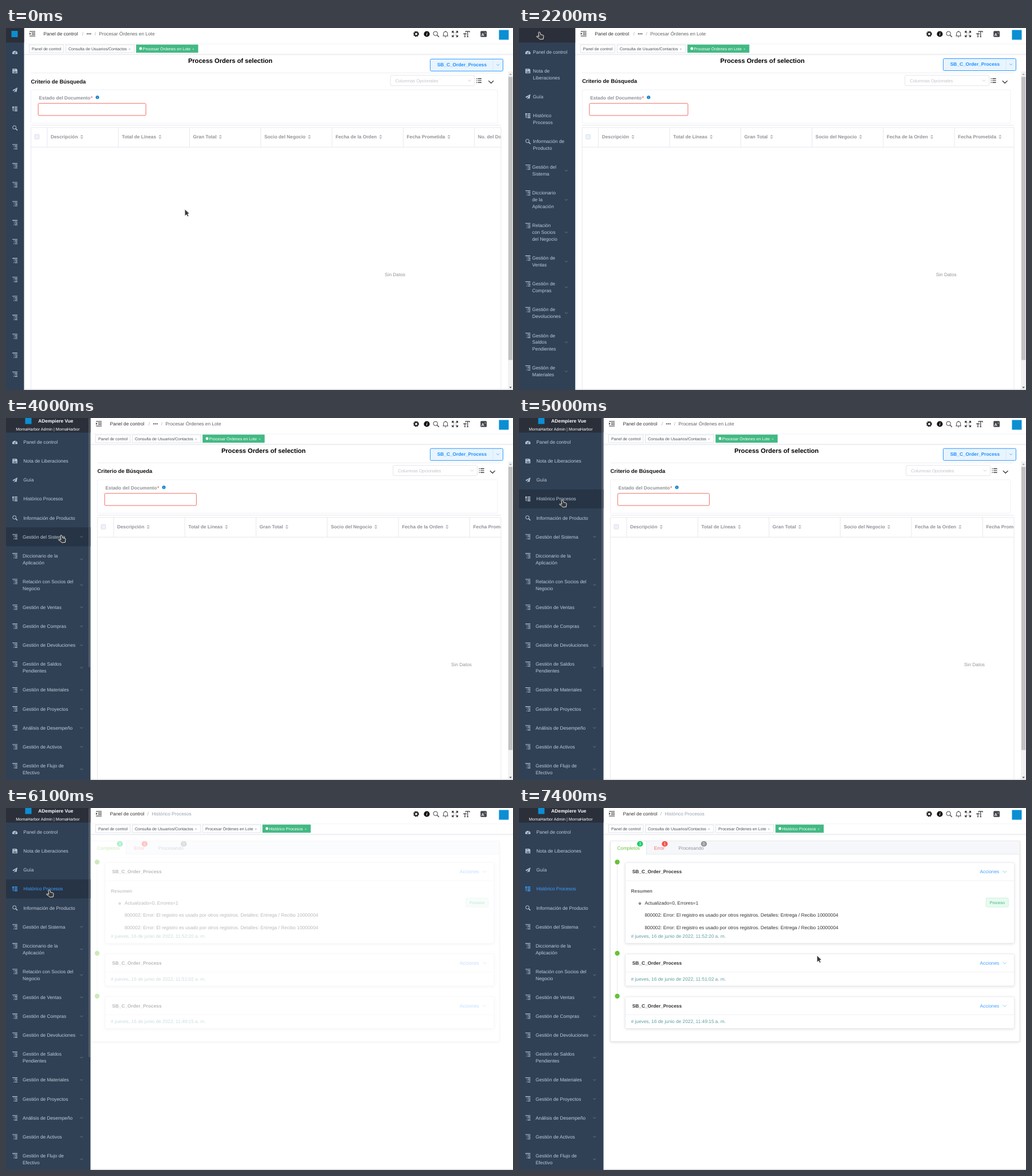
Animation of 885x633 px, one loop 8000 ms. Source, as an HTML page:

```html
<!DOCTYPE html>
<html lang="es">
<head>
<meta charset="utf-8">
<title>Panel de control</title>
<style>
html, body { margin: 0; width: 100%; height: 100%; overflow: hidden; background: #fff; }
svg { display: block; width: 885px; height: 633px; font-family: "Liberation Sans", Arial, sans-serif; text-rendering: geometricPrecision; }
</style>
</head>
<body>
<svg id="stage" viewBox="0 0 885 633" xmlns="http://www.w3.org/2000/svg"></svg>
<script>
const stage = document.getElementById('stage');
const LOOP = 8000, STEP = 100;
const FS = 8.3, SMALL = 7.11;
const BLUE = '#409eff', LOGO = '#0a8fd3', GREEN = '#67c23a', GREY = '#909399', INK = '#303133';
const ORG = 'MornaHarbor Admin | MornaHarbor';
const pen = document.createElement('canvas').getContext('2d');

// drawing helpers; text y is the middle of the capitals
function measure(s, size, bold) {
  pen.font = (bold ? 'bold ' : '') + '100px "Liberation Sans", Arial, sans-serif';
  return pen.measureText(s).width * size / 100;
}
const text = (x, y, s, fill = INK, size = FS, extra = '') =>
  `<text x="${x}" y="${y + size * 0.36}" font-size="${size}" fill="${fill}" ${extra}>${s}</text>`;
const bold = (x, y, s, fill, size = FS, extra = '') => text(x, y, s, fill, size, 'font-weight="700" ' + extra);
const MID = 'text-anchor="middle"';
const rect = (x, y, w, h, fill, stroke = 'none', rx = 0, extra = '') =>
  `<rect x="${x}" y="${y}" width="${w}" height="${h}" rx="${rx}" fill="${fill}" stroke="${stroke}" ${extra}/>`;
const path = (d, stroke, w = 1, fill = 'none') =>
  `<path d="${d}" stroke="${stroke}" stroke-width="${w}" fill="${fill}" stroke-linejoin="round"/>`;
const dot = (x, y, r, fill, stroke = 'none') => `<circle cx="${x}" cy="${y}" r="${r}" fill="${fill}" stroke="${stroke}"/>`;
const at = (x, y, body, op = 1) => `<g transform="translate(${x} ${y})" opacity="${op}">${body}</g>`;
const hline = (x1, x2, y, c) => path(`M${x1} ${y}H${x2}`, c, 0.8);
const vline = (x, y1, y2, c) => path(`M${x} ${y1}V${y2}`, c, 0.8);
const chevron = (x, y, r, c, w = 0.8) => path(`M${x - r} ${y - r / 2}l${r} ${r}l${r} ${-r}`, c, w);

// time helpers
function keyed(keys, t) {
  let i = 0;
  while (i < keys.length - 1 && keys[i + 1][0] <= t) i++;
  const a = keys[i], b = keys[i + 1] || a;
  const k = b === a ? 0 : (t - a[0]) / (b[0] - a[0]);
  return a.slice(1).map((v, j) => v + (b[j + 1] - v) * k);
}
function held(keys, t) {
  return keys.filter(k => k[0] <= t).pop().slice(1);
}

const CURSOR = [
  [0, 312, 317], [200, 312, 317], [400, 189, 47], [600, 189, 47], [1200, 30, 6], [2700, 30, 6],
  [2800, 67, 287], [3500, 85, 235], [3600, 85, 235], [4000, 91, 204], [4500, 80, 174],
  [5000, 70, 142], [6400, 70, 142], [6600, 428, 224], [6700, 428, 224], [7100, 530, 240], [7400, 520, 258]
];
const SIDEBAR = [[0, 31.5], [2200, 98.2], [2300, 135], [2400, 147.5]];
const BRAND = [[0, 0], [2400, 0.5], [2800, 0.86], [3000, 1]];
const TIP = [[0, 0], [2400, 1], [2800, 0.36], [2900, 0.1], [3000, 0]];
const ORDERS = [[0, 1, 0], [5300, 0.96, 1], [5500, 0.4, 15], [5700, 0.06, 27], [5800, 0, 30]];
const HISTORY = [[0, 0, -30], [6100, 0.33, -12.5], [6200, 0.8, -3.5], [6300, 1, 0]];

const MENU = ['Panel de control', 'Nota de Liberaciones', 'Guía', 'Histórico Procesos', 'Información de Producto',
  'Gestión del Sistema', 'Diccionario de la Aplicación', 'Relación con Socios del Negocio', 'Gestión de Ventas',
  'Gestión de Compras', 'Gestión de Devoluciones', 'Gestión de Saldos Pendientes', 'Gestión de Materiales',
  'Gestión de Proyectos', 'Análisis de Desempeño', 'Gestión de Activos', 'Gestión de Flujo de Efectivo', 'Gestión de Calidad'];

function wrap(s, max) {
  return s.split(' ').reduce((lines, word) => {
    const last = lines[lines.length - 1];
    if (last && (last + ' ' + word).length <= max) lines[lines.length - 1] = last + ' ' + word;
    else lines.push(word);
    return lines;
  }, []);
}

// icons centred on 0,0
const search = c => dot(-0.8, -0.8, 3, 'none', c) + path('M1.4 1.4L4.4 4.4', c, 1.5);
const MENU_ICONS = [
  c => path('M-4.4 3.6A4.6 4.6 0 1 1 4.4 3.6Z', 'none', 0, c) + path('M0 2L1.6 -2M-3 .6h1M2.3 .6h1M-2 -2l.6 .6', '#304156', 0.8) + dot(0, 2, 1.1, '#304156'),
  c => path('M-4.2 -4H2.6L4.2 -2.4V4H-4.2Z', 'none', 0, c) + path('M-2.6 -2H1M-2.6 1.2H2.8M-2.6 2.7H2.8', '#304156', 0.9),
  c => path('M4.5 -4.4L-4.5 .6L-2 1.8L3 -2.6L-.6 2.4L2.8 3.8ZM-1.6 2.5V4.5L-.2 3.1Z', 'none', 0, c),
  c => rect(-4.4, -4.2, 2.6, 2.6, c) + path('M-3.4 -2V3.2H-1.4M-3.4 .2H-1.4', c, 0.9) + path('M-.8 -3H4.4M-.6 .2H4.4M-.6 3.2H4.4', c, 1.7),
  search
];
const treeIcon = c => path('M-4.4 -4H4.4M-.4 -1.4H4.4M.8 1.2H4.4M-.4 3.8H4.4', c, 1.1) + path('M-2.6 -1.4h1M-1.4 1.2h1M-2.6 3.8h1', c, 1);

function sidebar(w, t, cur, hand) {
  const open = w > 60, wide = w > 110, active = t >= 5300;
  let out = rect(0, 0, w, 633, '#304156'), y = 42;
  MENU.forEach((name, i) => {
    const sub = i > 4;
    const lines = open ? wrap(name, wide ? 23 : sub ? 11 : 16) : [''];
    const extra = (lines.length - 1) * 11.9;
    const hover = hand && t >= 2900 && cur[1] + 2 > y - 16.6 && cur[1] + 2 <= y + 16.6 + extra;
    const color = active && i === 3 ? BLUE : '#bfcbd9';
    if (hover) out += rect(0, y - 16.6, w, 33.2 + extra, '#263445');
    out += at(15.5, y, (MENU_ICONS[i] || treeIcon)(color));
    const x = (sub ? 29 : 30.3) - (wide ? 0 : 6);
    lines.forEach((s, k) => out += text(x, y + k * 11.9, s, color));
    if (open && sub) out += chevron(w - 15.7, y + extra / 2, 2.4, '#8291a3', 0.7);
    y += 33.15 + extra;
  });
  out += rect(0, 0, w, 25.5, '#2b2f3a');
  if (!open) out += rect(9.5, 5, 11, 11, LOGO);
  const op = held(BRAND, t)[0];
  if (op) out += at(0, 0, rect(33.5, -0.5, 11, 11, LOGO) + bold(56.3, 5, 'ADempiere Vue', '#fff') +
    text(17.3, 19, ORG, '#fff', SMALL), op);
  if (t >= 2800 && t < 6500) out += rect(144, 0, 3.5, 436, '#909399', 'none', 1.7, 'opacity=".35"');
  return out;
}

function tag(x, label, close, active) {
  const tw = measure(label, SMALL), lead = active ? 6.6 : 0;
  const w = tw + 9 + (close ? 8.5 : 0) + lead;
  const ink = active ? '#fff' : '#495057';
  const body = rect(x, 29.3, w, 13.6, active ? '#42b983' : '#fff', active ? '#42b983' : '#d8dce5', 0, 'stroke-width=".8"') +
    (active ? dot(x + 7.4, 36, 2.4, '#fff') : '') + text(x + 4.5 + lead, 36.3, label, ink, SMALL) +
    (close ? text(x + 9.2 + lead + tw, 36.5, '×', active ? '#d9f1e6' : '#8a8f96', 6.2, MID) : '');
  return [body, x + w + 3.6];
}

function header(w, history) {
  const dark = '#3a3d42', slash = x => text(w + x, 10.3, '/', '#a4aab3', FS, MID);
  let out = rect(w, 0, 885 - w, 46, '#fff') + hline(w, 885, 27.8, '#eef0f2') + hline(w, 885, 46, '#d4d8e0') + hline(w, 885, 46.9, '#eff0f2');
  out += at(w + 14.6, 10, path('M-5 -4H5M-1.4 -1.3H5M-1.4 1.3H5M-5 4H5', '#222', 1.1) + path('M-5 -2L-2.6 0L-5 2Z', 'none', 0, '#222'));
  out += text(w + 34, 10.3, 'Panel de control', INK);
  if (history) out += slash(100.5) + text(w + 107, 10.3, 'Histórico Procesos', '#97a0ad');
  else {
    out += slash(102.5) + slash(124.4) + text(w + 130.7, 10.3, 'Procesar Órdenes en Lote', '#606266');
    [-2.9, 0, 2.9].forEach(d => out += dot(w + 113.3 + d, 10.3, 1, INK));
  }
  const tags = [['Panel de control', 0, 0], ['Consulta de Usuarios/Contactos', 1, 0], ['Procesar Órdenes en Lote', 1, !history]];
  if (history) tags.push(['Histórico Procesos', 1, 1]);
  let x = w + 9;
  tags.forEach(a => { const [body, next] = tag(x, ...a); out += body; x = next; });
  out += at(716, 10.5, `<circle r="4.2" fill="none" stroke="#222" stroke-width="1.6" stroke-dasharray="2 1.3"/><circle r="2.9" fill="none" stroke="#222" stroke-width="2"/>`);
  out += dot(734.5, 10.5, 5.1, '#111') + text(734.5, 10.5, 'i', '#fff', 8, MID + ' font-family="Liberation Serif, serif" font-weight="700" font-style="italic"');
  out += at(750.5, 10.5, dot(-0.8, -0.8, 3.7, 'none', dark) + path('M2 2L5.3 5.3', dark, 1.3));
  out += at(767.2, 10.5, path('M-4.8 3.4H4.8M-3.5 3.2V-.8A3.5 3.5 0 0 1 3.5 -.8V3.2M0 -5.4V-4.2M-1 5.2H1', dark, 1));
  const arrow = 'M1.4 1.4L4.6 4.6M4.8 1.8V4.8H1.8';
  out += at(783.7, 10.5, [0, 90, 180, 270].map(a => `<path transform="rotate(${a})" d="${arrow}" fill="none" stroke="${dark}" stroke-width="1.2"/>`).join(''));
  out += at(804, 10.5, path('M-1.6 -3V-4.6H5.2V-3M1.8 -4.6V5M.4 5H3.2M-5 .6V-.6H-.8V.6M-2.9 -.6V5M-4 5H-1.8', dark, 1.2));
  out += rect(828.3, 5.3, 10.8, 10.4, '#44474c', 'none', 1.5) + bold(832.3, 11, 'A', '#fff', 7, MID) + text(836.6, 8.6, 'x', '#fff', 4.5, MID);
  return out + rect(860.5, 3.5, 17, 17, LOGO);
}

function ordersPage(w) {
  const d = w - 31.5, left = w + 12, right = 864, lift = d > 60 ? -0.5 - d / 230 : 0, line = '#dfe3ea';
  let out = bold(391.5 + d / 2, 57.3, 'Process Orders of selection', '#000', 11.08, MID) + hline(left, right, 78.5, '#e8eaee');
  out += rect(740.5, 54.3 + lift, 127, 21, '#e8f4ff', '#1890ff', 2, 'stroke-width=".9"') + vline(850, 55 + lift, 75 + lift, '#cfe6fb') +
    bold(752.8, 64.3 + lift, 'SB_C_Order_Process', '#1890ff') + chevron(858.7, 64.5 + lift, 2.4, '#1890ff', 0.7);
  out += bold(left, 93.5 + lift / 1.2, 'Criterio de Búsqueda', '#111', 9.48);
  out += at(d * 0.04, 0, rect(671, 82.8, 147, 18, '#fff', '#dcdfe6', 2, 'stroke-width=".8"') + text(679.5, 92, 'Columnas Opcionales', '#c0c4cc', 7.7) +
    chevron(808.8, 91.8, 2.8, '#c0c4cc') + path('M823.6 88.6H830M823.6 92H830M823.6 95.4H830M821 88.6h1.3M821 92h1.3M821 95.4h1.3', '#222', 1.1));
  out += chevron(846.7 + d * 0.022, 94.3, 4.4, '#222', 1.1);
  out += rect(left, 108, 858 - left, 58.5, '#fff', '#ebeef5', 2, 'stroke-width=".8"');
  out += bold(w + 26, 122, 'Estado del Documento', GREY) + bold(w + 118.2, 122, '*', '#f56c6c', FS, MID) +
    dot(w + 128, 121.3, 3, '#1182cc') + bold(w + 128, 121.4, 'i', '#fff', 4.5, MID);
  out += rect(w + 24.7, 131.8, 188 - d * 0.24, 21.2, '#fff', '#f45b50', 2, 'stroke-width=".9"');
  out += hline(left, right, 170, '#dcdfe6');
  let table = '';
  const cols = ['Descripción', 'Total de Líneas', 'Gran Total', 'Socio del Negocio', 'Fecha de la Orden', 'Fecha Prometida', 'No. del Documento'];
  cols.forEach((name, i) => {
    const x = left + 28.4 + i * 124.3, s = x + 12.8 + measure(name, FS, true);
    table += vline(x, 174, 208, line) + bold(x + 6.1, 190.3, name, GREY) +
      path(`M${s - 2.7} 189.5L${s} 186.8L${s + 2.7} 189.5ZM${s - 2.7} 191.2L${s} 193.9L${s + 2.7} 191.2Z`, 'none', 0, '#b4b8c0');
  });
  out += `<clipPath id="cut"><rect x="0" y="170" width="${right}" height="463"/></clipPath><g clip-path="url(#cut)">${table}</g>`;
  out += hline(left, right, 174, line) + hline(left, right, 208.3, line) + vline(left, 174, 632, line) + vline(right, 174, 632, line);
  out += rect(w + 18.5, 186.3, 7.8, 7.8, '#edf2fc', '#d5d9e2', 1, 'stroke-width=".8"');
  out += text(w + 647.5, 431, 'Sin Datos', GREY, FS, MID);
  out += rect(876.3, 76, 8.7, 556, '#f1f1f1') + rect(877, 85.5, 7.2, 495, '#c1c1c1') +
    path('M878.4 82L880.6 79.4L882.8 82Z', 'none', 0, '#a0a0a0') + path('M878.4 627.4L880.6 630L882.8 627.4Z', 'none', 0, '#505050');
  return out;
}

const shadow = (x, y, w, h) => rect(x, y + 1.2, w, h, '#000', 'none', 2, 'opacity=".13" filter="url(#soft)"');

function historyPage() {
  let out = `<filter id="soft" x="-5%" y="-20%" width="110%" height="140%"><feGaussianBlur stdDeviation="2.4"/></filter>`;
  out += shadow(159.5, 58, 714.5, 350.5) + rect(159.5, 58, 714.5, 350.5, '#fff', '#dcdfe6', 0, 'stroke-width=".8"');
  out += rect(160, 58.4, 713.6, 22.6, '#f5f7fa') + hline(222.5, 874, 81, '#e4e7ed') + rect(160, 58.4, 62.5, 23.2, '#fff') + vline(222.5, 58, 81, '#dcdfe6');
  [['Completos', 171.3, GREEN, '3', '#13ce66'], ['Error', 235.7, '#f56c6c', '1', '#f9514c'], ['Procesando', 278.2, GREY, '0', GREY]].forEach(([s, x, c, n, b]) => {
    const e = x + measure(s, FS);
    out += text(x, 70.2, s, c) + rect(e - 4.9, 58, 10.4, 9.4, b, 'none', 4.7) + text(e + 0.3, 62.8, n, '#fff', SMALL, MID);
  });
  out += vline(171.5, 99, 250, '#e4e7ed') + vline(171.5, 258, 325, '#e4e7ed');
  [[94.5, 95.5, 141, 224, '52:20'], [254, 255.3, 55.7, 299, '51:02'], [329, 330, 55.5, 373, '49:15']].forEach(([c, y, h, dateY, clock]) => {
    out += dot(171.5, c, 4.2, GREEN) + shadow(185.5, y, 679, h) + rect(185.5, y, 679, h, '#fff', '#e6e9f0', 2, 'stroke-width=".8"');
    out += hline(185.5, 864.5, y + 31.5, '#ebeef5') + bold(197.8, y + 15.8, 'SB_C_Order_Process', INK);
    out += text(804.5, y + 15.8, 'Acciones', BLUE) + chevron(847.8, y + 15.9, 3.2, '#79b8f5');
    out += text(195.6, dateY, `# jueves, 16 de junio de 2022, 11:${clock} a. m.`, '#5f9ea0');
  });
  out += bold(195.6, 145, 'Resumen', '#606266') + dot(211, 167, 1.5, 'none', INK) + text(219.4, 166, 'Actualizado=0, Errores=1');
  [187.2, 208.8].forEach(y => out += text(219.4, y, '800002: Error: El registro es usado por otros registros. Detalles: Entrega / Recibo 10000004'));
  out += rect(815.3, 157.3, 39, 15.8, '#e7faf0', '#c6f0da', 2, 'stroke-width=".8"') + text(834.8, 165.3, 'Proceso', '#30b878', SMALL, MID);
  return out;
}

const tooltip = () => rect(154, 9.8, 123.3, 18.8, INK, 'none', 2.5) + path('M150.5 19L154.2 15.6V22.4Z', 'none', 0, INK) + text(160, 19.3, ORG, '#fff', SMALL);

const pointer = hand => hand
  ? path('M4.6 1.2Q6.3 .4 6.9 2.2L7.9 5.6L11.8 6.4Q13.2 6.9 13 8.4L12.3 13.4L6.5 14L4.6 11.8L1 9.6Q.3 8.4 1.7 8.1L4.8 8.9L3.9 2.6Q3.8 1.6 4.6 1.2Z', '#fff', 0.9, '#383838')
  : path('M.2 0L8 7.4L5 8.2L6.8 11.8L4.9 12.7L3.1 9.2L.2 11.4Z', '#fff', 0.5, '#3a3a3a');

function draw(t) {
  const w = held(SIDEBAR, t)[0], cur = keyed(CURSOR, t);
  const hand = t >= 1200 && t < 6500;
  const [op1, dx1] = held(ORDERS, t), [op2, dx2] = held(HISTORY, t), tip = held(TIP, t)[0];
  let out = rect(0, 0, 885, 633, '#fff');
  if (op1) out += at(dx1, 0, ordersPage(w), op1);
  if (op2) out += at(dx2, 0, historyPage(), op2);
  out += rect(w, 631.3, 885 - w, 1.7, '#dedfe1') + header(w, t >= 5300) + sidebar(w, t, cur, hand);
  if (tip) out += at(0, 0, tooltip(), tip);
  stage.innerHTML = out + at(cur[0], cur[1], pointer(hand));
}

let shown = -1;
function tick(now) {
  const t = Math.floor(now % LOOP / STEP) * STEP;
  if (t !== shown) draw(shown = t);
  requestAnimationFrame(tick);
}
draw(0);
requestAnimationFrame(tick);
</script>
</body>
</html>
```
